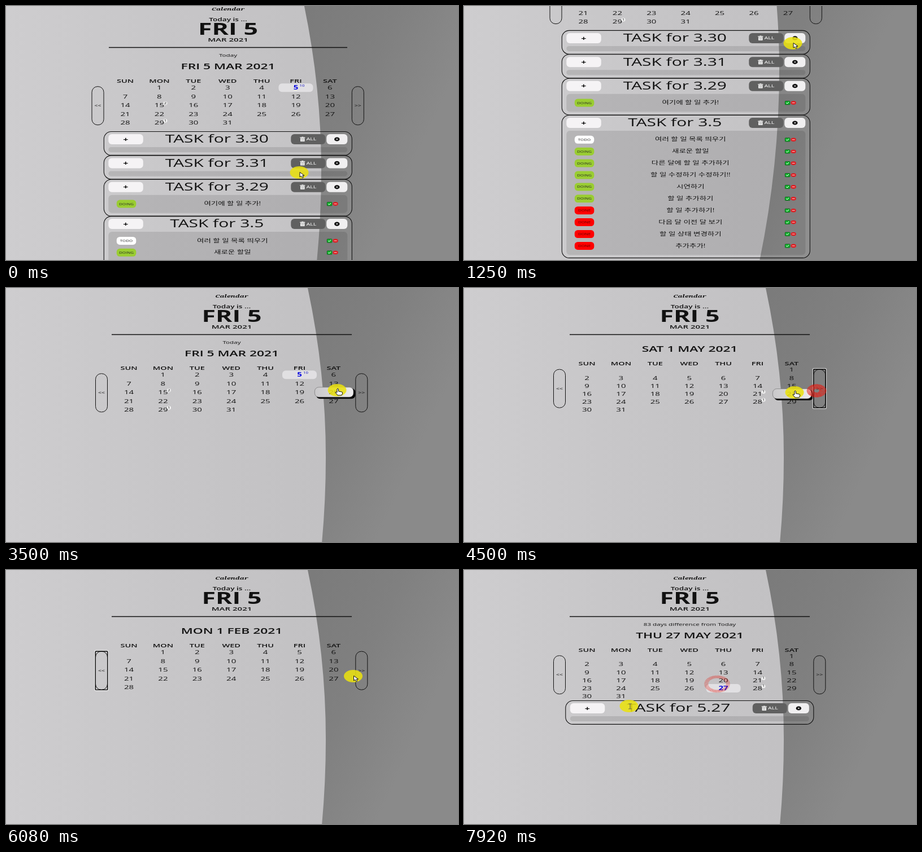
Recreate the animation shown at these times as an HTML page with a canvas. Size 800 by 450 pixels, loop 8000 ms.

```html
<!DOCTYPE html>
<html lang="ko">
<head>
<meta charset="utf-8">
<title>Calendar</title>
<style>
html, body { margin: 0; width: 100%; height: 100%; overflow: hidden; background: #c6c5c7; }
canvas { display: block; width: 800px; height: 450px; }
</style>
</head>
<body>
<canvas id="stage" width="800" height="450"></canvas>
<script>
const ctx = document.getElementById('stage').getContext('2d');
const LOOP = 8000, STEP = 1000 / 12, WIDEN = 1.55;
const SANS = '"Open Sans", "Noto Sans", "Noto Sans CJK KR", "Noto Sans CJK JP", sans-serif';
const DAYS = ['SUN', 'MON', 'TUE', 'WED', 'THU', 'FRI', 'SAT'];
const MONTHS = ['JAN', 'FEB', 'MAR', 'APR', 'MAY'];
const STATUS = { TODO: '#ffffff', DOING: '#9acd32', DONE: '#ff0000' };
const BADGES = { 2: { 5: 10, 15: 2, 29: 1 }, 4: { 21: 1, 28: 1 } };

const PANELS = [
  { title: '3.30', tasks: [] },
  { title: '3.31', tasks: [] },
  { title: '3.29', tasks: [['DOING', '여기에 할 일 추가!']] },
  { title: '3.5', tasks: [
    ['TODO', '여러 할 일 목록 띄우기'], ['DOING', '새로운 할일'],
    ['DOING', '다른 달에 할 일 추가하기'], ['DOING', '할 일 수정하기 수정하기!!'],
    ['DOING', '시연하기'], ['DOING', '할 일 추가하기'],
    ['DONE', '할 일 추가하기!'], ['DONE', '다음 달 이전 달 보기'],
    ['DONE', '할 일 상태 변경하기'], ['DONE', '추가추가!']] }
];
const NEW_PANEL = { title: '5.27', tasks: [] };

const PATH = [
  [0, 519, 295], [700, 519, 295], [1120, 577, 77], [1250, 582, 66], [1400, 585, 58],
  [1700, 586, 99], [1920, 586, 99], [2250, 588, 141], [2380, 588, 141], [2500, 591, 156],
  [2750, 586, 207], [2860, 586, 207], [3250, 588, 190], [3500, 586, 181],
  [3750, 627, 182], [4290, 624, 182], [4500, 585, 185], [4950, 168, 180],
  [5560, 168, 180], [5900, 600, 190], [6080, 614.5, 188], [6250, 631, 182],
  [6700, 631, 182], [6950, 560, 50], [7250, 190, 200], [7500, 448, 202],
  [7590, 448, 202], [7916, 292, 241]
];
const CLICKS = [
  { t: 1420, act: 'close' }, { t: 1900, act: 'close' }, { t: 2380, act: 'close' }, { t: 2830, act: 'close' },
  { t: 3800, act: 'next' }, { t: 4290, act: 'next' },
  { t: 5000, act: 'prev' }, { t: 5250, act: 'prev' }, { t: 5500, act: 'prev' },
  { t: 6300, act: 'next' }, { t: 6480, act: 'next' }, { t: 6650, act: 'next' },
  { t: 7580, act: 'pick' }
];

const clamp = v => Math.max(0, Math.min(1, v));
const ease = v => { v = clamp(v); return v * v * (3 - 2 * v); };
const listHeight = n => n ? 11 + 20.9 * n : 9;
const panelHeight = p => 33.4 + listHeight(p.tasks.length);

function pointerAt(t) {
  let i = 0;
  while (i < PATH.length - 2 && PATH[i + 1][0] <= t) i++;
  const [t0, x0, y0] = PATH[i], [t1, x1, y1] = PATH[i + 1];
  const k = ease((t - t0) / (t1 - t0));
  return { x: x0 + (x1 - x0) * k, y: y0 + (y1 - y0) * k };
}

function stateAt(t) {
  const s = { closed: 0, month: 2, picked: 5, focus: null };
  for (const { t: at, act } of CLICKS) {
    if (at > t) break;
    s.focus = null;
    if (act === 'close') s.closed++;
    else if (act === 'pick') s.picked = 27;
    else {
      s.month += act === 'next' ? 1 : -1;
      s.picked = 0;
      s.focus = act;
    }
  }
  s.panels = s.picked === 27 ? [NEW_PANEL] : PANELS.slice(s.closed);
  s.scrollable = s.closed < 4;
  const pageHeight = 234.6 + s.panels.reduce((sum, p) => sum + panelHeight(p), 0);
  s.scroll = s.scrollable ? Math.min(9 + 180 * ease(t / 850), pageHeight - 450) : 0;
  s.shift = s.scrollable ? -6.5 : 0;
  return s;
}

function text(str, x, y, size, { weight = 400, color = '#111', font = SANS, style = '' } = {}) {
  ctx.save();
  ctx.translate(x, y + size * 0.357);
  ctx.scale(WIDEN, 1);
  ctx.font = `${style} ${weight} ${size}px ${font}`;
  ctx.textAlign = 'center';
  ctx.fillStyle = color;
  ctx.fillText(str, 0, 0);
  ctx.restore();
}

function box(x, y, w, h, r, fill, stroke, width = 1) {
  ctx.beginPath();
  ctx.roundRect(x, y, w, h, r);
  if (fill) { ctx.fillStyle = fill; ctx.fill(); }
  if (stroke) { ctx.strokeStyle = stroke; ctx.lineWidth = width; ctx.stroke(); }
}

function oval(x, y, rx, ry, fill) {
  ctx.beginPath();
  ctx.ellipse(x, y, rx, ry, 0, 0, Math.PI * 2);
  ctx.fillStyle = fill;
  ctx.fill();
}

function line(points, color, width) {
  ctx.beginPath();
  points.forEach(([x, y], i) => i ? ctx.lineTo(x, y) : ctx.moveTo(x, y));
  ctx.strokeStyle = color;
  ctx.lineWidth = width;
  ctx.stroke();
}

function gradient(x0, y0, x1, y1, ...colors) {
  const g = ctx.createLinearGradient(x0, y0, x1, y1);
  colors.forEach((c, i) => g.addColorStop(i / (colors.length - 1), c));
  return g;
}

function backdrop(s) {
  ctx.fillStyle = gradient(0, 0, 560, 0, '#cecdcf', '#c7c6c8', '#c2c1c3');
  ctx.fillRect(0, 0, 800, 450);
  ctx.save();
  ctx.translate(s.scrollable ? 0 : 8, -s.scroll);
  ctx.beginPath();
  ctx.moveTo(526, 0);
  ctx.quadraticCurveTo(558, 150, 558, 300);
  ctx.quadraticCurveTo(558, 470, 523, 640);
  ctx.lineTo(810, 640);
  ctx.lineTo(810, 0);
  ctx.fillStyle = gradient(540, 0, 800, 120, '#7b7b7b', '#808080', '#8a8a8a');
  ctx.fill();
  ctx.restore();
}

function header(s) {
  text('Calendar', 399.5, 14, 7.9, { weight: 700, style: 'italic', font: '"Noto Serif", serif' });
  text('Today is ...', 399.5, 32.5, 8.8, { weight: 600 });
  text('FRI 5', 399.5, 50, 28.8, { weight: 700 });
  text('MAR 2021', 399.5, 68.7, 9.7, { weight: 600 });
  const half = s.scrollable ? 211 : 212.5;
  line([[399.5 - half, 82.5], [399.5 + half, 82.5]], '#111', 1.3);
}

function arrowButton(x, y, sign, focused) {
  if (focused) {
    box(x - 1, y - 1, 24, 71, 1, null, 'rgba(255,255,255,.85)', 1);
    box(x + .3, y + .3, 21.4, 68.4, 1, null, '#000', 1.4);
  }
  box(x + .5, y + .5, 21, 68, 10, null, '#111', 1);
  text(sign, x + 11, y + 34.5, 6.8);
}

function calendar(s, pointer) {
  const top = s.picked ? 8 : 0;
  const first = new Date(2021, s.month, 1).getDay();
  const count = new Date(2021, s.month + 1, 0).getDate();
  const rows = Math.ceil((first + count) / 7);
  const startY = (rows > 5 ? 145 : 146) + (s.picked ? 7.8 : 0);
  const pitch = rows > 5 ? 14.2 : 15.5;
  const px = pointer.x - s.shift, py = pointer.y + s.scroll;
  let hovered = null;

  if (s.picked) text(s.picked === 5 ? 'Today' : '83 days difference from Today', 399.5, 96.7, 7.5);
  const day = s.picked || 1;
  const weekday = DAYS[(first + day - 1) % 7];
  text(`${weekday} ${day} ${MONTHS[s.month]} 2021`, 399.5, 108 + top, 14.7, { weight: 600 });
  DAYS.forEach((d, i) => text(d, 217.5 + 60.4 * i, 133.3 + top, 9.4, { weight: 600 }));

  for (let d = 1; d <= count; d++) {
    const slot = first + d - 1;
    const x = 217.5 + 60.4 * (slot % 7), y = startY + pitch * Math.floor(slot / 7);
    const picked = d === s.picked;
    if (Math.abs(px - x) < 30 && Math.abs(py - y) < pitch / 2) {
      hovered = d;
      box(x - 31, y - 7, 69.5, 18.5, 7, '#050505');
      box(x - 33.5, y - 9, 68.5, 17.5, 7, gradient(x - 34, 0, x + 34, 0, '#c9c8ca', '#d8d7d8', '#eeedee'), '#666', .6);
    } else if (picked) {
      box(x - 30.5, y - 7.5, 61, 15, 6, 'rgba(244,243,245,.62)');
    }
    text(d, x, y, 9.7, picked ? { weight: 700, color: '#0808e0' } : {});
    const badge = BADGES[s.month]?.[d];
    if (badge) {
      if (!picked) oval(x + 10.5, y - 3.5, 3.6, 3.2, 'rgba(255,255,255,.75)');
      text(badge, x + (picked ? 11 : 10.5), y - 3.9, 5, { color: picked ? '#0808c0' : '#111' });
    }
  }
  const arrowY = 143.7 + (s.picked ? 7.5 : 0);
  arrowButton(158, arrowY, '<<', s.focus === 'prev');
  arrowButton(618.3, arrowY, '>>', s.focus === 'next');
  const onArrow = py > arrowY && py < arrowY + 69 && ((px > 158 && px < 180) || (px > 618 && px < 640));
  return hovered || onArrow;
}

function trash(x, y) {
  ctx.fillStyle = '#fff';
  ctx.fillRect(x - 4.5, y - 3.5, 9, 1.3);
  ctx.fillRect(x - 1.5, y - 4.3, 3, 1);
  ctx.fillRect(x - 3.7, y - 1.6, 7.4, 5.6);
  for (const dx of [-1.7, 0, 1.7]) line([[x + dx, y - .8], [x + dx, y + 3.2]], '#777', .6);
}

function taskRow(x, y, [status, label]) {
  box(x + 22.5, y - 7, 34.5, 14, 5.5, STATUS[status]);
  text(status, x + 39.7, y + .2, 5.1, { color: status === 'DONE' ? '#5a0000' : '#222' });
  text(label, x + 227.5, y - .5, 8.7);
  box(x + 395, y - 3, 8.5, 6.2, .8, '#10b52a', '#075a14', .8);
  line([[x + 397, y], [x + 398.7, y + 1.6], [x + 401.8, y - 1.6]], '#fff', 1);
  oval(x + 409.8, y, 4.7, 3.3, '#dd1d22');
  line([[x + 407.3, y], [x + 412.3, y]], '#f6c8c8', 1.1);
}

function panel(p, y) {
  const x = 179.8, n = p.tasks.length;
  box(x, y + .5, 439, panelHeight(p) - .5, 13, 'rgba(255,255,255,.04)', '#111', 1.1);
  box(x + 8, y + 5, 61.5, 18, 6, '#f5f3f5');
  text('+', x + 38.5, y + 14, 10.3, { weight: 700 });
  text(`TASK for ${p.title}`, x + 200, y + 13.4, 19.3);
  box(x + 331, y + 5, 61, 18, 6, '#606060');
  trash(x + 351.5, y + 14);
  text('ALL', x + 367, y + 14, 6.9, { color: '#fff' });
  box(x + 394, y + 5, 37, 18, 6, '#f0eff0');
  const cx = x + 412.5, cy = y + 14;
  oval(cx, cy, 4.7, 3.6, '#080808');
  line([[cx - 1.6, cy - 1.3], [cx + 1.6, cy + 1.3]], '#fff', .9);
  line([[cx + 1.6, cy - 1.3], [cx - 1.6, cy + 1.3]], '#fff', .9);
  box(x + 8, y + 28, 423, listHeight(n), n ? 6 : 4.5, 'rgba(0,0,0,.105)');
  p.tasks.forEach((task, i) => taskRow(x, y + 43.8 + 20.9 * i, task));
}

function splash(t) {
  for (const { t: at } of CLICKS) {
    const age = t - at;
    if (age < 0 || age > 420) continue;
    const { x, y } = pointerAt(at);
    const outer = 7.5 + age * .043, inner = outer * .75 * clamp((age - 110) / 250);
    ctx.save();
    ctx.globalAlpha = 1 - ease((age - 120) / 380);
    ctx.setLineDash([1.8, .7]);
    for (let r = outer; r > Math.max(inner, 1); r -= 1.8) {
      ctx.beginPath();
      ctx.ellipse(x, y, r, r * .66, 0, 0, Math.PI * 2);
      ctx.strokeStyle = '#e32219';
      ctx.lineWidth = 1.6;
      ctx.stroke();
    }
    ctx.restore();
  }
}

function shape(d, x, y) {
  ctx.save();
  ctx.translate(x, y);
  const path = new Path2D(d);
  ctx.fillStyle = '#fff';
  ctx.strokeStyle = '#111';
  ctx.lineWidth = 1;
  ctx.fill(path);
  ctx.stroke(path);
  ctx.restore();
}

function cursor({ x, y }, kind) {
  oval(x, y, 16.5, 11, 'rgba(235,226,16,.87)');
  if (kind === 'hand') {
    shape('M-1 0Q0-2 1.5 0V4L7 5Q9 5 8.5 8L7 11H0L-4 6Q-4 4-1 6Z', x + 1, y - 2);
  } else if (kind === 'text') {
    line([[x - 1, y - 4], [x + 5, y - 4]], '#555', .8);
    line([[x + 2, y - 4], [x + 2, y + 5]], '#555', 1);
    line([[x - 1, y + 5], [x + 5, y + 5]], '#555', .8);
  } else {
    shape('M0 0V8.5L2.5 6.7L4.5 10L6.3 9.2L4.7 6L8 5.8Z', x + 1, y - .5);
  }
}

function draw(t) {
  const s = stateAt(t), pointer = pointerAt(t);
  backdrop(s);
  ctx.save();
  ctx.translate(s.shift, -s.scroll);
  header(s);
  const clickable = calendar(s, pointer);
  let y = 231;
  for (const p of s.panels) {
    panel(p, y);
    y += panelHeight(p);
  }
  ctx.restore();
  splash(t);
  const overTitle = s.picked === 27 && pointer.y > 234 && pointer.x > 285;
  cursor(pointer, clickable ? 'hand' : overTitle ? 'text' : 'arrow');
}

const start = performance.now();
function frame() {
  const t = (performance.now() - start) % LOOP;
  draw(Math.floor((t + 7) / STEP) * STEP % LOOP);
  requestAnimationFrame(frame);
}
frame();
</script>
</body>
</html>
```
